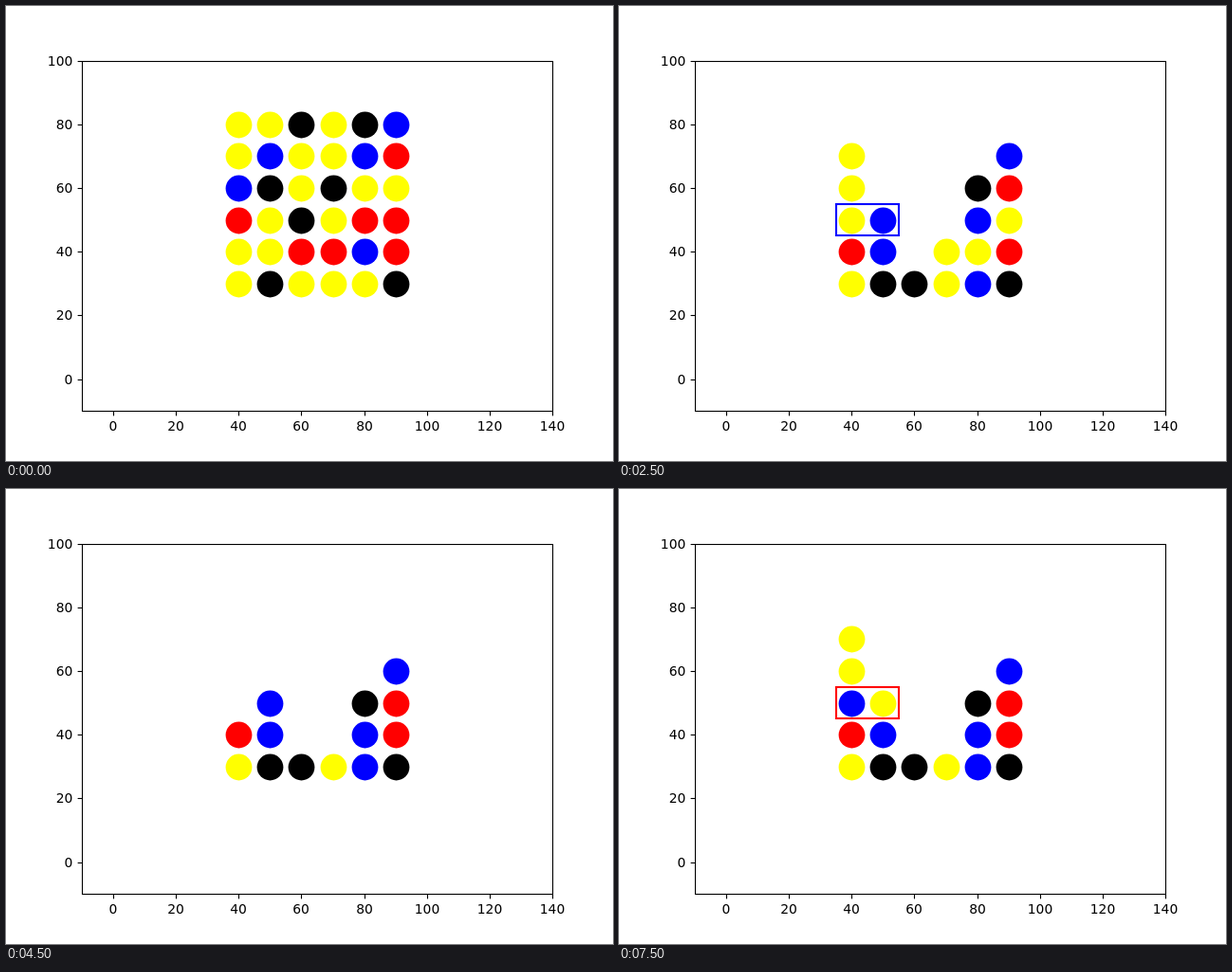
Recreate the animation shown at these times as an HTML page with a canvas. Size 640 by 480 pixels, loop 8000 ms.

```html
<!DOCTYPE html>
<html>
<head>
<meta charset="utf-8">
<style>
html, body { margin: 0; width: 100%; height: 100%; overflow: hidden; background: #fff; }
canvas { display: block; }
</style>
</head>
<body>
<canvas width="640" height="480"></canvas>
<script>
const ctx = document.querySelector('canvas').getContext('2d');
const STEP = 500;
const RED = '#f00', BLUE = '#00f';
const COLORS = { y: '#ff0', k: '#000', r: RED, b: BLUE };

// Columns from left to right, each listed from the bottom up.
const START = 'yyrbyy kyykby yrkyyk yrykyy ybrybk krryrb';
const CLEARED = 'yrbyy kby k yy bybk kryrb';
const LEFT_DONE = 'yr kbb k yy bybk kryrb';
const RIGHT_DONE = 'yrbyy kby k y bbk krrb';
const BOTH_DONE = 'yr kbb k y bbk krrb';

// Each move names two neighbouring cells as [column, row].
const CENTRE = [[4, 1], [4, 2]];
const LEFT = [[0, 2], [1, 2]];
const RIGHT = [[5, 1], [5, 2]];

const steps = [
  [START], [START, CENTRE], [START, CENTRE, true],
  [CLEARED], [CLEARED, LEFT], [CLEARED, LEFT, true],
  [LEFT_DONE], [LEFT_DONE, RIGHT], [LEFT_DONE, RIGHT, true],
  [BOTH_DONE], [LEFT_DONE],
  [CLEARED], [CLEARED, RIGHT], [CLEARED, RIGHT, true],
  [RIGHT_DONE], [RIGHT_DONE, LEFT]
];

// Data units to whole pixels.
const px = x => Math.round(80 + (x + 10) * 496 / 150);
const py = y => Math.round(57.6 + (100 - y) * 3.36);

function line(x1, y1, x2, y2) {
  ctx.beginPath();
  ctx.moveTo(x1, y1);
  ctx.lineTo(x2, y2);
  ctx.stroke();
}

function drawAxes() {
  ctx.strokeStyle = ctx.fillStyle = '#000';
  ctx.lineWidth = 1.11;
  ctx.font = '13.89px "DejaVu Sans", sans-serif';
  ctx.strokeRect(80.5, 58.5, 496, 369);
  ctx.textAlign = 'center';
  for (let v = 0; v <= 140; v += 20) {
    const x = px(v);
    line(x + 0.5, 427.5, x + 0.5, 432.4);
    ctx.fillText(v, x, 448);
  }
  ctx.textAlign = 'right';
  for (let v = 0; v <= 100; v += 20) {
    const y = py(v);
    line(75.6, y + 0.5, 80.5, y + 0.5);
    ctx.fillText(v, 70.3, y + 5);
  }
}

function drawBoard([board, move, swapped]) {
  const columns = board.split(' ').map(s => [...s]);
  if (swapped) {
    const [[c, r], [d, s]] = move;
    [columns[c][r], columns[d][s]] = [columns[d][s], columns[c][r]];
  }
  columns.forEach((column, c) => column.forEach((color, r) => {
    ctx.fillStyle = COLORS[color];
    ctx.beginPath();
    ctx.arc(px(40 + 10 * c) + 0.5, py(30 + 10 * r) + 0.5, 13.9, 0, 2 * Math.PI);
    ctx.fill();
  }));
  if (move) {
    const [[c, r], [d, s]] = move;
    const x = px(35 + 10 * c), y = py(35 + 10 * s);
    ctx.strokeStyle = swapped ? BLUE : RED;
    ctx.lineWidth = 2.08;
    ctx.strokeRect(x, y, px(45 + 10 * d) - x, py(25 + 10 * r) - y);
  }
}

function draw() {
  const i = Math.floor(performance.now() / STEP) % steps.length;
  ctx.fillStyle = '#fff';
  ctx.fillRect(0, 0, 640, 480);
  drawAxes();
  drawBoard(steps[i]);
  requestAnimationFrame(draw);
}
draw();
</script>
</body>
</html>
```
